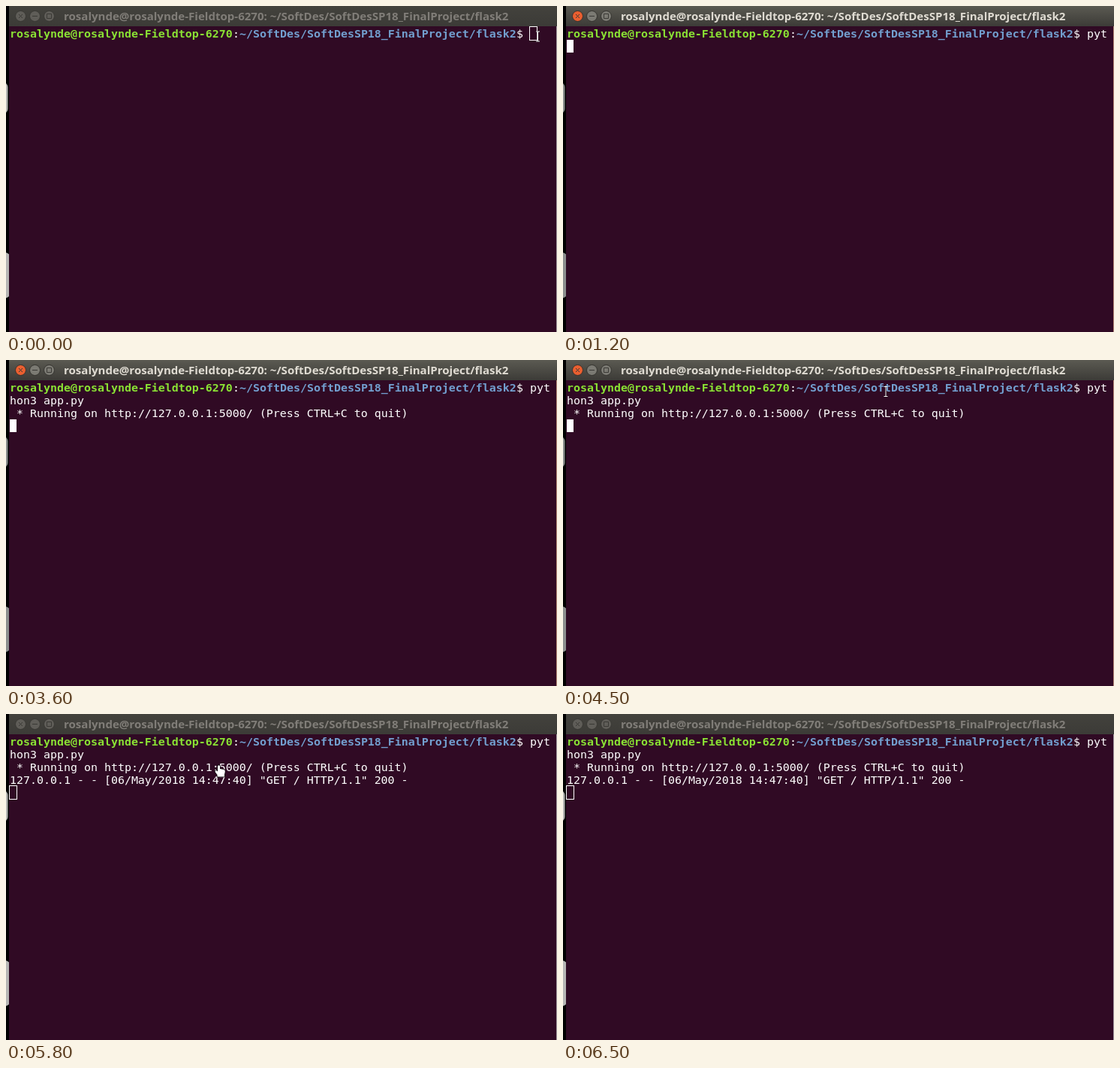
Animation of 734x434 px, one loop 7.1 s. Source, as an HTML page:

```html
<!DOCTYPE html>
<html lang="en">
<head>
<meta charset="utf-8">
<title>Terminal</title>
<style>
  html, body { margin: 0; width: 734px; height: 434px; overflow: hidden; background: #000; }
  svg { display: block; }
  text { white-space: pre; }
  .term { font: 14.95px "DejaVu Sans Mono", monospace; fill: #fff; }
  .user { font-weight: 700; fill: #8ae234; }
  .path { font-weight: 700; fill: #729fcf; }
  .title { font: 700 15.05px "Noto Sans", sans-serif; fill: #dfdbd2; }
  .bar { fill: url(#active); }
  .dock { fill: #8c8f8e; }
  .edge { fill: #b58a78; }
  .button { fill: #7b7a73; stroke: #32312d; }
  .close { fill: #ea5f30; }
  .glyph { fill: none; stroke: #3a3935; }
  .idle .title { fill: #807d78; }
  .idle .bar { fill: url(#inactive); }
  .idle .dock { fill: #b6b6b4; }
  .idle .edge { fill: #a39aa0; }
  .idle .button { fill: #5f5d58; stroke: #383733; }
  #block { fill: #fff; }
  .idle #block { fill: none; stroke: #fff; }
  #hand { fill: #fff; stroke: #000; stroke-width: 1.4; paint-order: stroke; }
</style>
</head>
<body>
<svg id="stage" width="734" height="434" viewBox="0 0 734 434">
  <defs>
    <linearGradient id="active" x2="0" y2="1">
      <stop stop-color="#5b5a52"/><stop offset="1" stop-color="#3c3b37"/>
    </linearGradient>
    <linearGradient id="inactive" x2="0" y2="1">
      <stop stop-color="#43423d"/><stop offset="1" stop-color="#3c3b37"/>
    </linearGradient>
  </defs>

  <rect width="734" height="434"/>
  <rect class="dock" x="-30" y="102" width="32.5" height="41" rx="6"/>
  <rect class="dock" x="-40" y="328" width="46" height="61" rx="8"/>

  <rect x="4" width="730" height="434" fill="#300a24"/>
  <rect class="edge" x="733" y="27" width="1" height="407"/>
  <rect class="bar" x="4" width="730" height="27"/>
  <circle class="button close" cx="19.5" cy="13.5" r="7"/>
  <circle class="button" cx="38.5" cy="13.5" r="7"/>
  <circle class="button" cx="57.5" cy="13.5" r="7"/>
  <path class="glyph" d="M17 11l5 5m0-5l-5 5M35 13.5h7M54.5 10.5h6v6h-6z"/>
  <text class="title" x="77" y="19">rosalynde@rosalynde-Fieldtop-6270: ~/SoftDes/SoftDesSP18_FinalProject/flask2</text>

  <g class="term">
    <text y="42"><tspan class="user" x="5">rosalynde@rosalynde-Fieldtop-6270</tspan><tspan x="302">:</tspan><tspan class="path" x="311">~/SoftDes/SoftDesSP18_FinalProject/flask2</tspan><tspan x="680">$</tspan></text>
    <text id="head" x="698" y="42"></text>
    <text id="tail" x="5" y="59"></text>
    <text id="running" x="14" y="76">* Running on http://127.0.0.1:5000/ (Press CTRL+C to quit)</text>
    <text id="request" x="5" y="93">127.0.0.1 - - [06/May/2018 14:47:40] "GET / HTTP/1.1" 200 -</text>
  </g>
  <rect id="underline" x="131" y="78" width="198" height="1" fill="#fff"/>
  <rect id="block"/>

  <g id="mouse">
    <g id="beam" fill="none">
      <path d="M-2.5-6.5H2.5M0-6.5V6.5M-2.5 6.5H2.5" stroke="#000" stroke-opacity=".5" stroke-width="2"/>
      <path d="M-2.5-6.5H2.5M0-6.5V6.5M-2.5 6.5H2.5" stroke="#fff"/>
    </g>
    <path id="arrow" d="M0 0V15L3.5 11.8L6 17.5L8.4 16.4L6 11H11Z" fill="#000" stroke="#fff"/>
    <path id="hand" d="M-1 1.2Q.5-.6 2 1.2V5L7.5 6Q9 6.6 8.8 9L8 12.5V15.5H-1.5V13L-4.5 9Q-5 7-2.5 7.2L-1 8.5Z"/>
  </g>
</svg>

<script>
  const LOOP = 7100, COLS = 80, PROMPT = 77;
  const command = 'python3 app.py ';
  // [time, characters typed]
  const keys = [[0, 0], [1000, 1], [1100, 2], [1200, 3], [1300, 5], [1400, 6],
    [1600, 7], [1700, 8], [1900, 9], [2000, 10], [2200, 15]];
  const blinks = [[800, 1000], [2800, 3200], [3800, 4400], [5000, 5800]];
  // [time, x, y] of the pointer
  const path = [[4200, 602, 12], [4500, 430, 42], [4700, 340, 58], [4900, 291, 64],
    [5000, 288, 63], [5100, 286, 67], [5300, 283, 68], [5900, 283, 68],
    [6200, 340, 50], [6400, 520, 8], [6500, 600, -20]];

  const el = id => document.getElementById(id);
  const show = (id, on) => el(id).style.display = on ? '' : 'none';
  const within = (t, a, b) => t >= a && t < b;

  function pointerAt(t) {
    if (t < 800) return [708.5, 40.5];
    if (!within(t, 4200, 6500)) return null;
    const i = path.findIndex(p => p[0] > t);
    const [t0, x0, y0] = path[i - 1], [t1, x1, y1] = path[i];
    const k = (t - t0) / (t1 - t0);
    return [x0 + (x1 - x0) * k, y0 + (y1 - y0) * k].map(Math.round);
  }

  function drawMouse(t) {
    const pos = pointerAt(t);
    show('mouse', pos);
    let kind = '';
    if (pos) {
      const [x, y] = pos;
      const onLink = t >= 3600 && within(x, 131, 329) && within(y, 62, 79);
      kind = y < 27 ? 'arrow' : onLink ? 'hand' : 'beam';
      el('mouse').setAttribute('transform', `translate(${x} ${y})`);
    }
    for (const id of ['beam', 'arrow', 'hand']) show(id, id === kind);
    show('underline', kind === 'hand' && t < 5800);
  }

  function drawBlock(t, typed, idle) {
    let cell = PROMPT + typed;
    if (t >= 3200) cell = COLS * (t < 3600 ? 2 : t < 5800 ? 3 : 4);
    const grow = idle ? 0.5 : 0;
    const box = {
      x: 5 + cell % COLS * 9 - grow,
      y: 28 + Math.floor(cell / COLS) * 17 - grow,
      width: 9 + 2 * grow,
      height: 17 + 2 * grow
    };
    for (const name in box) el('block').setAttribute(name, box[name]);
    show('block', !blinks.some(([a, b]) => within(t, a, b)));
  }

  function draw(now) {
    const t = Math.floor(now % LOOP / 100) * 100;
    const idle = t < 200 || t >= 5800;
    const typed = keys.filter(k => k[0] <= t).pop()[1];
    el('stage').classList.toggle('idle', idle);
    el('head').textContent = command.slice(0, Math.min(typed, 3));
    el('tail').textContent = command.slice(3, Math.max(typed, 3));
    show('running', t >= 3600);
    show('request', t >= 5800);
    drawBlock(t, typed, idle);
    drawMouse(t);
  }

  let start;
  function tick(now) {
    start ??= now;
    draw(now - start);
    requestAnimationFrame(tick);
  }
  draw(0);
  requestAnimationFrame(tick);
</script>
</body>
</html>
```
